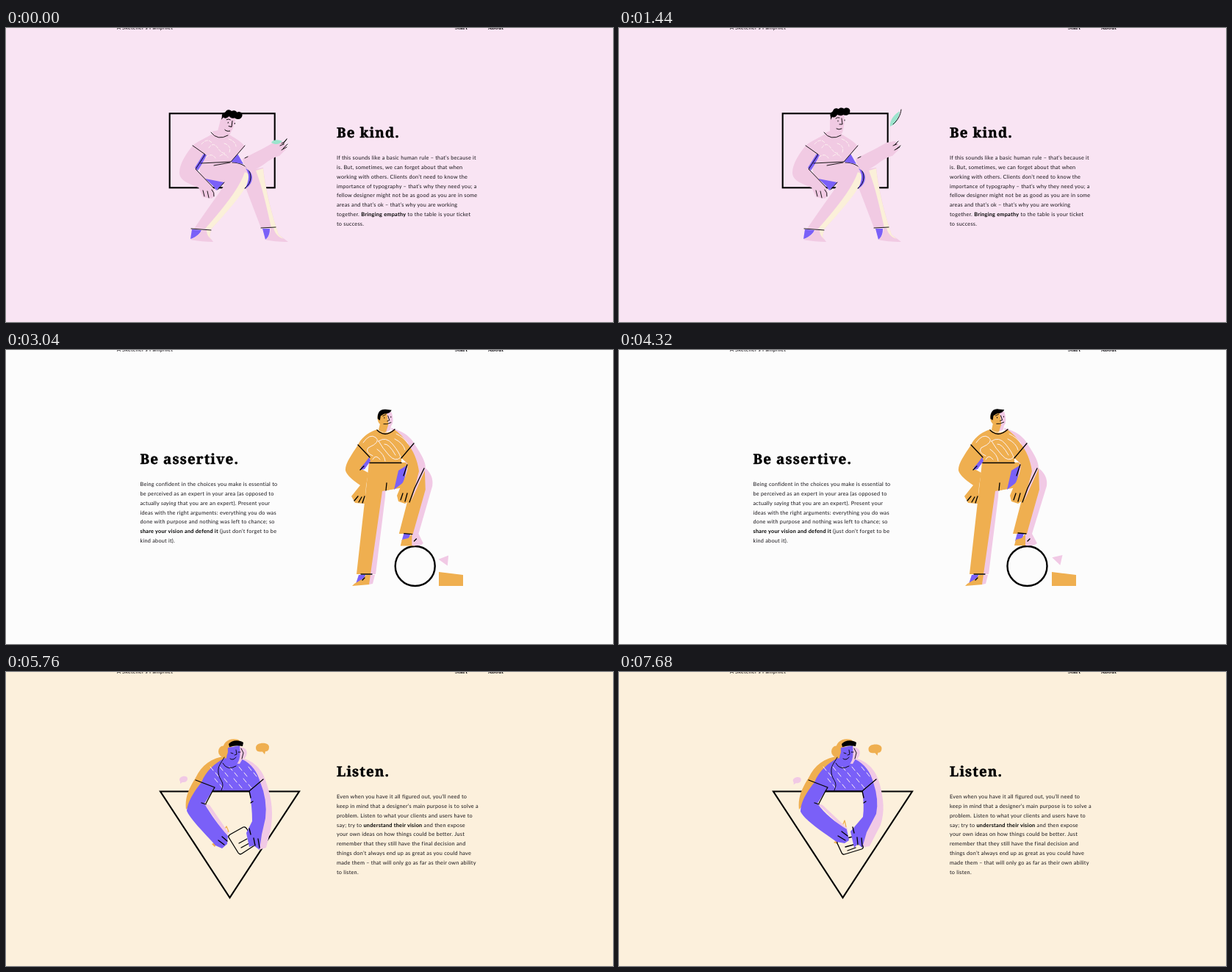
Recreate the animation shown at these times as an HTML page. Size 826 by 400 pixels, loop 7.76 s.

```html
<!DOCTYPE html>
<html lang="en">
<head>
<meta charset="utf-8">
<title>Manifesto pages</title>
<style>
html, body { margin: 0; width: 100%; height: 100%; overflow: hidden; background: #fcfcfc }
svg { display: block; width: 826px; height: 400px }
text { font: 7.3px Lato, "Open Sans", sans-serif; letter-spacing: .24px; fill: #151217; text-rendering: geometricPrecision }
.head { font: 900 18.8px "Noto Serif", serif; letter-spacing: 1.1px; fill: #000; stroke: #000; stroke-width: .5 }
.nav { font: 700 6.8px "Noto Serif", serif; letter-spacing: 0 }
.b { font-weight: 700; fill: #000 }
.i { font-style: italic }
.k, .w { fill: none; stroke: #000; stroke-width: 1.3; stroke-linecap: round; stroke-linejoin: round }
.w { stroke: #fdf1f0; stroke-width: 1 }
.k.thin { stroke-width: .9 }
.frame { fill: none; stroke: #000; stroke-width: 2.1 }
.p { fill: #f1c9e5 } .s { fill: #f1cae3 } .v { fill: #7a60f8 }
.o { fill: #efaf50 } .c { fill: #fbf0d9 } .t { fill: #9ce4cd }
</style>
</head>
<body>
<svg viewBox="0 0 826 400">
<g class="scene">
  <rect width="826" height="400" fill="#f9e4f3"/>
  <rect class="frame" x="222.700" y="116.300" width="143" height="101"/>
  <!-- far leg -->
  <path class="s" d="M326 217C331 210 334 203 333 193L350 190C353 218 361 250 368 272H347Z"/>
  <path class="c" d="M340 194L350 191C353 220 361 250 368 272H361C356 250 350 220 340 194Z"/>
  <path class="v" d="M349 273H359C359 280 357 285 353 288Z"/>
  <path class="s" d="M353 288C358 284 360 279 360 272H368L371 281 384 291C371 291 361 290 353 288Z"/>
  <path class="c" d="M364 272H368L371 281 378 287C371 285 366 280 364 272Z"/>
  <!-- near leg -->
  <path class="s" d="M262 185L306 181C322 183 332 190 332 200C330 217 300 250 279 274L256 273C270 252 285 232 297 214L266 206Z"/>
  <path class="c" d="M333 200C331 217 301 250 279 274L271 273C291 250 316 222 325 196Z"/>
  <path class="v" d="M326 191C339 196 337 213 325 219C331 208 332 199 326 191ZM271 205L297 210 286 221C283 215 277 210 271 205ZM253 274L266 275C263 282 256 286 251 287Z"/>
  <path class="s" d="M251 288C258 284 264 280 267 275H279L277 284 282 291C270 291 260 290 251 288Z"/>
  <path class="c" d="M273 275H279L277 284 280 288C275 284 273 280 273 275Z"/>
  <path class="k thin" d="M308 183C322 183 333 191 333 203Q333 212 325 218M252 273L279 275M347 272L367 271M283 187L305 183M297 210L288 220"/>
  <!-- arms and shirt -->
  <path class="s" d="M322 178C338 170 354 162 364 156L375 154Q383 157 380 166L372 174C356 178 350 190 332 195Q323 189 322 178Z"/>
  <path class="v" d="M306 182L315 171 323 185Z"/>
  <path class="s" d="M281 144C272 150 262 153 254 160L271 172 265 184 306 182 325 161C319 153 310 149 302 144Z"/>
  <path class="s" d="M254 160L271 172C264 184 258 190 260 195Q274 207 283 219L284 228 280 232 268 230 262 217C248 212 236 207 236 197C236 184 246 170 254 160Z"/>
  <path class="v" d="M269 171L273 173 266 186 261 194 257 190Z"/>
  <path class="w" d="M266 158Q274 149 280 156M276 163Q282 154 288 163T299 170M303 151Q312 154 313 161M272 176Q280 169 285 177M297 157Q307 160 304 169M291 174Q298 169 302 176" stroke-dasharray="4 2"/>
  <path class="k thin" d="M254 160L271 172 258 192 283 218M325 160L306 182 265 184M325 177L329 175M268 221L270 229M274 222L276 231M280 220Q284 224 283 229M373 160L378 158M375 166L382 162"/>
  <path class="k thin" d="M377 158L382 151M377 164L383 158" data-to="M375 159L380 154M377 165L383 160"/>
  <path class="t" d="M361 156C364 151 371 152 376 154C372 159 366 159 361 156Z" data-to="M369 134C368 124 376 117 382 113C381 122 377 131 369 134Z"/>
  <path class="k thin" d="M375 157C378 156 380 154 382 151" data-to="M373 131C379 126 383 119 384 111"/>
  <g id="head">
    <path class="s" d="M287 119L306 117Q308 129 304 142Q302 147 296 145L301 148Q289 156 280 143L287 140Z"/>
    <path d="M288 121C286 115 290 115 291 113C293 107 298 110 299 110C302 107 306 109 306 110C311 106 316 111 314 115C312 120 307 119 305 118C301 121 299 118 297 118Q294 123 290 121L288 125Z"/>
    <path class="k thin" d="M303 123L304 131 300 131M296 137Q299 139 303 137M298 126V127M307 125V126M295 123Q297 121 300 122"/>
  </g>
  <path class="k thin" d="M279 142Q288 154 302 146"/>
</g>

<g class="scene">
  <rect width="826" height="400" fill="#fcfcfc"/>
  <path class="o" d="M589 302L622 306V321H589Z"/>
  <path id="wedge" class="p" d="M-8.7 -.5L4.4 -6.8V7.2Z"/>
  <circle id="ball" class="frame" cy="294" r="27" style="stroke-width:2.4"/>
  <!-- bent leg -->
  <path class="p" d="M556 153L570 160Q581 170 579 185L561 250H548Z" data-to="M556 153L570 160Q584 170 582 185L562 250H549Z"/>
  <path class="v" d="M541 250H550L548 257 538 260Z" data-to="M542 249H551L549 257 539 260Z"/>
  <path class="o" d="M538 258L547 256 552 250 556 267 536 267Z" data-to="M540 258L548 256 553 250 557 266 538 266Z"/>
  <path class="p" d="M552 250H561L567 263Q563 267 552 266Z" data-to="M553 250H562L569 263Q564 267 553 266Z"/>
  <path class="o" d="M517 153H556L569 162 570 190 553 250H534L548 196 552 185 518 191Z" data-to="M517 153H556L571 162 572 190 555 250H536L550 196 553 185 518 191Z"/>
  <path class="k" d="M541 250L552 251M555 260L558 257" data-to="M543 249L554 250M556 260L559 257"/>
  <!-- standing leg -->
  <path class="p" d="M500 160H518L516 200 503 305H492Z"/>
  <path class="o" d="M494 153H538L531 188 518 191 512 192 496 305H477Z"/>
  <path class="v" d="M480 306H489L488 314 476 318ZM547 156L541 180 528 190 534 164ZM487 145L495 147 488 162 482 163Z"/>
  <path class="o" d="M474 318L486 311 490 306H497L495 319 471 321Z"/>
  <path class="p" d="M496 306H502L499 318 494 319Z"/>
  <path class="k" d="M483 305H498M485 313L488 310M518 181L517 191"/>
  <!-- torso and arms -->
  <path class="p" d="M524 106Q547 112 556 128C565 142 575 157 569 166L552 204 540 190 546 156 534 140Z"/>
  <path class="o" d="M505 108C490 113 483 121 479 129C470 143 461 155 462 164Q464 172 482 184L470 199 475 208 488 209 490 185 493 167 482 161 495 146V153H538V147L546 154Q549 164 537 186L532 198 534 206 543 209 552 203 562 165C560 150 554 136 546 127Q538 114 528 108Q517 117 505 108Z"/>
  <path class="v" d="M482 163L494 146 496 151 488 162Z"/>
  <path class="w" d="M486 126Q495 113 503 119T493 133Q488 139 499 144M507 124Q517 117 526 128T537 146Q530 153 521 143T507 124ZM515 128Q521 127 530 143M505 135Q515 142 516 151M531 114Q541 119 547 127M499 149Q503 141 509 149M529 121Q541 127 543 136"/>
  <path class="k" d="M479 129L495 146M555 127L538 147M495 153.5H538M505 109Q516 120 529 108M482 163L487 158M474 205L479 199M480 207L484 200M485 208L488 199M537 204L540 195M543 206L546 195M546 156L541 171M549 207L556 188 569 161"/>
  <g id="face">
    <path class="o" d="M506 89L519 83 521 108Q516 116 507 109L509 101Q505 98 506 89Z"/>
    <path class="p" d="M518 84L525 85Q529 98 524 104L523 109 517 112 521 100Z"/>
    <path d="M506 94C505 85 510 80 517 81L525 82Q523 87 515 87L510 90 509 96Z"/>
    <path class="k thin" d="M520 90L522 96 519 97M514 101Q518 102 524 99M515 92V93M524 91V92M513 90L517 88"/>
  </g>
</g>

<g class="scene">
  <rect width="826" height="400" fill="#fcf0dc"/>
  <path class="frame" d="M210 162.5H399L304.5 307Z"/>
  <!-- speech bubbles -->
  <path class="o" id="say" d="M340 103C340 95 358 95 358 102Q358 108 353 108L352 112 349 108.500C344 109 340 108 340 103Z"/>
  <path class="p" id="reply" d="M236 146C237 141 247 140 247 145C247 150 242 150 240 150L237 152V149Q236 148 236 146Z"/>
  <!-- coloured edges -->
  <path class="o" d="M300 114C279 117 266 127 258 144C249 158 243 171 245 187L266 165 294 128Z"/>
  <path class="p" d="M322 117C344 124 351 139 355 153C362 174 364 193 360 215L354 239 344 242 338 170 330 130Z" data-to="M322 117C344 124 351 139 355 153C360 174 362 189 356 208L341 237 330 239 338 170 330 130Z"/>
  <!-- tablet and pencil -->
  <path class="k" d="M295 218L300 210 303 217Z" style="stroke:#efaf50" data-to="M302 214L307 202 309 211Z"/>
  <path class="o" d="M280 234L290 229 284 238Z" data-to="M292 232L299 227 297 234Z"/>
  <path class="k" style="fill:#fcf0dc" d="M305 221L323 211Q326 210 328 214L339 231Q340 234 338 236L321 247Q318 249 316 246L303 225Q302 223 305 221Z" data-to="M299 229L322 223Q325 222 327 225L332 237Q333 240 330 241L307 248Q304 249 303 246L297 233Q296 231 299 229Z"/>
  <path class="k" d="M317 233L328 227M320 239L331 233" data-to="M308 238L319 235M311 243L322 239"/>
  <!-- arms -->
  <path class="p" d="M270 179L277 181 303 219 300 223Z" data-to="M270 179L277 181 311 213 309 217Z"/>
  <path class="v" d="M266 150L284 157 270 179C278 193 291 211 302 223L301 234 294 240 285 236C272 221 252 202 246 189C247 178 254 165 266 150Z" data-to="M266 150L284 157 270 179C279 192 295 205 310 214L313 229 307 233 296 231C275 216 254 203 247 190C247 178 254 165 266 150Z"/>
  <path class="v" d="M331 163L346 150Q356 174 353 199L348 221 345 242 337 236 331 238 327 219 335 203Q335 182 331 163Z" data-to="M331 163L346 150Q354 174 350 193L337 218 331 239 325 234 320 239 315 217 332 197Q334 181 331 163Z"/>
  <path class="k" d="M266 178L272 180M333 178L336 176M289 229L297 235M294 224L301 230M333 221L331 213M339 236L337 226M345 239L343 227" data-to="M266 178L272 180M333 178L336 176M298 223L308 229M303 217L311 223M320 219L318 211M325 235L324 225M331 237L330 226"/>
  <!-- shirt -->
  <path class="v" d="M298 117C284 124 272 135 266 150L284 157 282 162H332L331 163 346 150C342 136 334 125 322 119Z"/>
  <path id="dashes" class="w"/>
  <path class="k" d="M258 147L284 157 281 162H331L350 146M331 162L333 171M281 162L272 179"/>
  <!-- head -->
  <path class="o" d="M295 108C294 95 304 89 316 92L319 95 305 103 304 118 297 117Z"/>
  <path class="p" d="M315 101L323 103Q330 106 327 114Q325 118 322 118L318 125 310 124Z"/>
  <path class="v" d="M302 103L318 100Q320 117 315 124Q310 130 302 127L296 126 300 117Z"/>
  <ellipse class="o" cx="295.500" cy="108" rx="6.500" ry="7.500"/>
  <path d="M303 98C307 92 318 92 323 96L322 101Q313 99 304 102Z"/>
  <path class="k thin" d="M297 116C292 125 288 128 289 137C290 148 299 149 293 161M295 124Q301 135 313 128M305 118Q309 121 313 116M313 106L314 112 311 113M306 110L309 111M316 109H319M320 104L323 110 321 118"/>
</g>

<text x="151" y="1.800">A Sketcher’s Pamphlet</text>
<text class="nav" x="611" y="1.800">Start</text>
<text class="nav" x="656" y="1.800">About</text>
</svg>
<script>
const LOOP = 7760, STEP = 80;
const $ = id => document.getElementById(id);
const scenes = [...document.querySelectorAll('.scene')];

// Each page: where its text stands and when it shows
const pages = [
  { start: 0, x: 450, y: 148.5, title: 'Be kind.', lines: [
    'If this sounds like a basic human rule – that’s because it',
    'is. But, sometimes, we can forget about that when',
    'working with others. Clients don’t need to know the',
    'importance of typography – that’s why they need you; a',
    'fellow designer might not be as good as you are in some',
    'areas and that’s ok – that’s why you are working',
    'together. *Bringing empathy* to the table is your ticket',
    'to success.'] },
  { start: 1840, x: 182.5, y: 154.5, title: 'Be assertive.', lines: [
    'Being confident in the choices you make is essential to',
    'be perceived as an expert in your area (as opposed to',
    'actually _saying_ that you are an expert). Present your',
    'ideas with the right arguments: everything you do was',
    'done with purpose and nothing was left to chance; so',
    '*share your vision and defend it* (just don’t forget to be',
    'kind about it).'] },
  { start: 5200, x: 450, y: 141.5, title: 'Listen.', lines: [
    'Even when you have it all figured out, you’ll need to',
    'keep in mind that a designer’s main purpose is to solve a',
    'problem. Listen to what your clients and users have to',
    'say; try to *understand their vision* and then expose',
    'your own ideas on how things could be better. Just',
    'remember that they still have the final decision and',
    'things don’t always end up as great as you could have',
    'made them – that will only go as far as their own ability',
    'to listen.'] }
];

const style = s => s
  .replace(/\*(.+?)\*/g, '<tspan class="b">$1</tspan>')
  .replace(/_(.+?)_/g, '<tspan class="i">$1</tspan>');

pages.forEach((p, n) => {
  const body = p.lines.map((line, i) =>
    `<text x="${p.x}" y="${p.y + 30.7 + i * 12.8}">${style(line)}</text>`).join('');
  scenes[n].insertAdjacentHTML('beforeend',
    `<text class="head" x="${p.x}" y="${p.y}">${p.title}</text>${body}`);
});

// Slanted strokes on the listener's shirt
let dashes = '';
for (let row = 0; row < 4; row++)
  for (let x = 278 + row * 3; x < 338 - row * 3; x += 13)
    dashes += `M${x + row % 2 * 4} ${129 + row * 8}l4 5`;
$('dashes').setAttribute('d', dashes);

// Paths with data-to blend between two poses
const numbers = /-?[\d.]+/g;
const blends = scenes.map(scene => [...scene.querySelectorAll('[data-to]')].map(el => {
  const from = el.getAttribute('d'), to = el.dataset.to.match(numbers);
  return k => {
    let i = 0;
    el.setAttribute('d', from.replace(numbers, a => (+a + (to[i++] - a) * k).toFixed(2)));
  };
}));

const swing = (t, start, half) => (1 - Math.cos(Math.PI * (t - start) / half)) / 2;
const move = (id, value) => $(id).setAttribute('transform', value);

const poses = [
  t => {
    const k = swing(t, 0, 1440);
    move('head', `rotate(${14 * (1 - k)} 291 145)`);
    return k;
  },
  t => {
    const k = swing(t, 2000, 2400);
    $('ball').setAttribute('cx', 557.5 - 2 * k);
    move('wedge', `translate(${596.7 + k} ${286.7 - 2 * k}) rotate(${13 * k})`);
    move('face', `translate(0 ${-.6 * k}) rotate(${-1.5 * k} 516 110)`);
    return k;
  },
  t => {
    const k = swing(t, 5760, 1920);
    move('say', `translate(${-.5 * k} ${1.7 * k})`);
    move('reply', `translate(${.7 * k} ${1.2 * k})`);
    return k;
  }
];

function draw(now) {
  const t = Math.floor(now % LOOP / STEP) * STEP;
  const page = pages.filter(p => p.start <= t).length - 1;
  scenes.forEach((scene, n) => scene.style.display = n === page ? '' : 'none');
  const k = poses[page](t);
  blends[page].forEach(blend => blend(k));
}

let origin;
function tick(now) {
  origin ??= now;
  draw(now - origin);
  requestAnimationFrame(tick);
}
requestAnimationFrame(tick);
</script>
</body>
</html>
```
